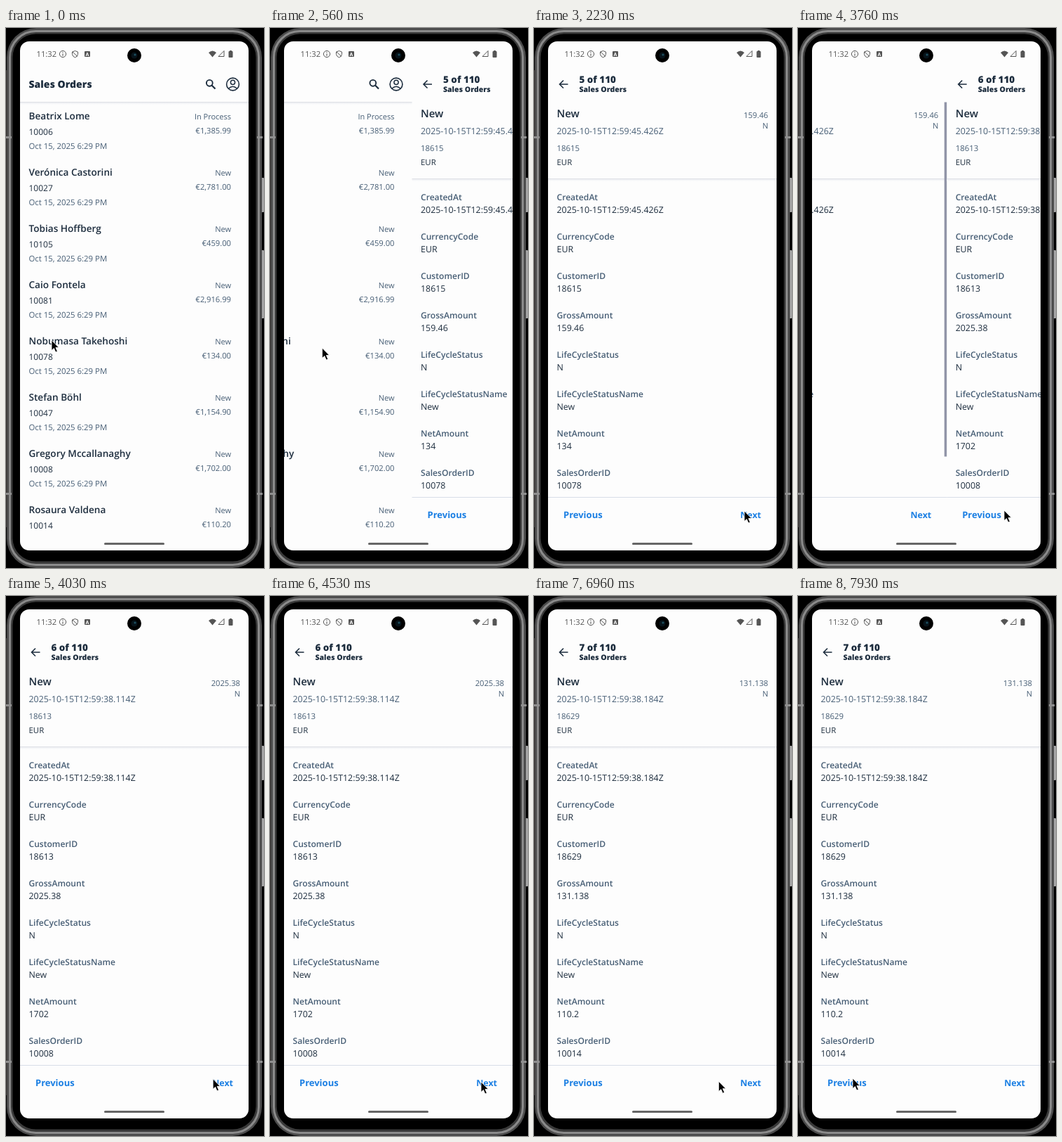
An HTML page that plays this animation: 368 by 768 pixels, repeating every 8 s.

```html
<!DOCTYPE html>
<html lang="en">
<head>
<meta charset="utf-8">
<title>Sales Orders</title>
<style>
html, body { margin: 0; width: 100%; height: 100%; overflow: hidden; background: #000; }
svg { display: block; width: 368px; height: 768px; font-family: "Open Sans", "Noto Sans", sans-serif; }
text { white-space: pre; text-rendering: geometricPrecision; }
</style>
</head>
<body>
<svg id="stage" viewBox="0 0 368 768"></svg>
<script>
const LOOP = 8000, WIDTH = 326, SLIDE = 350;
const INK = '#1d2d3e', SOFT = '#475e75', BLUE = '#1b7fe3';
const slides = [400, 3607, 6240];
const cursorPath = [
  [0, 65, 444], [480, 65, 444], [1130, 285, 702], [1750, 285, 702], [2150, 300, 687],
  [3300, 300, 687], [3660, 294, 686], [3900, 294, 686], [4400, 301, 691],
  [6700, 301, 691], [7700, 78, 686], [8000, 78, 686]
];
const orders = [
  ['Beatrix Lome', 10006, '1,385.99', 'In Process'],
  ['Verónica Castorini', 10027, '2,781.00'],
  ['Tobias Hoffberg', 10105, '459.00'],
  ['Caio Fontela', 10081, '2,916.99'],
  ['Nobumasa Takehoshi', 10078, '134.00'],
  ['Stefan Böhl', 10047, '1,154.90'],
  ['Gregory Mccallanaghy', 10008, '1,702.00'],
  ['Rosaura Valdena', 10014, '110.20']
];
const details = [
  ['2025-10-15T12:59:45.426Z', '18615', '159.46', '134', '10078'],
  ['2025-10-15T12:59:38.114Z', '18613', '2025.38', '1702', '10008'],
  ['2025-10-15T12:59:38.184Z', '18629', '131.138', '110.2', '10014']
];

const text = (x, y, size, str, fill = INK, weight = 400, anchor = 'start') =>
  `<text x="${x}" y="${y}" font-size="${size}" font-weight="${weight}" text-anchor="${anchor}" fill="${fill}">${str}</text>`;
const rect = (x, y, w, h, fill, r = 0, more = '') =>
  `<rect x="${x}" y="${y}" width="${w}" height="${h}" rx="${r}" fill="${fill}" ${more}/>`;
const path = (d, stroke, width, fill = 'none') =>
  `<path d="${d}" fill="${fill}" stroke="${stroke}" stroke-width="${width}"/>`;
const circle = (x, y, r, fill, stroke = 'none', width = 0) =>
  `<circle cx="${x}" cy="${y}" r="${r}" fill="${fill}" stroke="${stroke}" stroke-width="${width}"/>`;
const shadowLine = y => rect(20, y, WIDTH, 1, '#dfe1e6') + rect(20, y + 1, WIDTH, 3, 'url(#shade)');

function listPage() {
  const rows = orders.map(([name, id, price, status = 'New'], i) => {
    const y = 80 * i;
    return text(32.5, y + 129.5, 13.6, name, INK, 600) + text(32.5, y + 151.5, 12, id) +
      (i < 7 ? text(32.5, y + 171.5, 11.4, 'Oct 15, 2025 6:29 PM', SOFT) : '') +
      text(321, y + 129.5, 11, status, SOFT, 400, 'end') +
      text(321, y + 150, 11.2, '€' + price, SOFT, 400, 'end');
  }).join('');
  return text(32.5, 84.5, 14, 'Sales Orders', INK, 800) +
    circle(290.3, 78.3, 4.4, 'none', INK, 1.9) + path('M293.5 81.5 298.5 86.5', INK, 2.2) +
    circle(323.5, 80, 8.9, 'none', INK, 1.6) + circle(323.5, 77.3, 3.1, 'none', INK, 1.5) +
    path('M317.5 86Q323.5 80.5 329.5 86', INK, 1.5) + shadowLine(105) + rows;
}

function detailPage([date, customer, gross, net, id], i) {
  const fields = [['CreatedAt', date], ['CurrencyCode', 'EUR'], ['CustomerID', customer], ['GrossAmount', gross],
    ['LifeCycleStatus', 'N'], ['LifeCycleStatusName', 'New'], ['NetAmount', net], ['SalesOrderID', id]];
  return path('M48.5 80H37M42 74.5 36.5 80 42 85.5', INK, 1.6) +
    text(64.5, 78, 13.4, `${i + 5} of 110`, INK, 800) + text(64.5, 91, 10.5, 'Sales Orders', INK, 800) +
    text(32.5, 126.5, 15, 'New', INK, 600) + text(32.5, 151, 12.4, date, SOFT) +
    text(32.5, 174.5, 11.4, customer, SOFT) + text(32.5, 195, 11.4, 'EUR') +
    text(334, 127.5, 11.2, gross, SOFT, 400, 'end') + text(334, 143, 11, 'N', SOFT, 400, 'end') +
    shadowLine(214) +
    fields.map(([label, value], k) =>
      text(32.5, 245 + 56 * k, 12.1, label, SOFT, 600) + text(32.5, 262.5 + 56 * k, 12.4, value)).join('') +
    rect(20, 667, WIDTH, 1, '#d8dde8') +
    text(42, 697, 13, 'Previous', BLUE, 700) + text(324, 697, 12.4, 'Next', BLUE, 700, 'end') +
    rect(342.5, 105.5, 3.5, 504, '#9295a8', 0, `id="bar${i}"`);
}

const phone =
  rect(364, 213, 4, 49, '#a4a4a4', 1) + rect(364, 316, 4, 97, '#a4a4a4', 1) +
  rect(0, 60, 2, 650, '#35302e') +
  rect(1, 0, 364, 768, '#4c4c4c', 42) +
  rect(5.5, 4.5, 355, 759, '#3a3a3a', 37, 'stroke="#8a8a8a" stroke-width="3"') +
  [[0, 154], [0, 661], [358, 154], [358, 661]].map(([x, y]) => rect(x, y, 8, 3, '#8f8f8f')).join('') +
  rect(9.5, 8.5, 347, 750, '#000', 33) +
  rect(20, 19, WIDTH, 724, '#fdfdfd', 13);

const statusBar = text(43.5, 41.2, 11.2, '11:32', '#555') +
  circle(81, 37, 4.6, 'none', '#555', 1) + path('M81 36.5V39.8M81 34V35.2', '#555', 1.1) +
  path('M98.5 32.5 102.5 34V37.5Q102 40.5 98.5 42 95 40.5 94.5 37.5V34ZM95 34 102 40.5', '#555', 1) +
  rect(112, 33, 8, 8, '#555', 1) + text(116, 39.5, 7, 'A', '#fdfdfd', 700, 'middle') +
  path('M289 35Q294.5 30 300 35L294.5 41.5Z', 'none', 0, '#555') +
  path('M303 40.5H311V32.5Z', '#555', 1) + rect(317.5, 33, 6, 9, '#555', 1) + rect(319, 32, 3, 2, '#555') +
  circle(183, 39, 10, '#000') + circle(183, 39, 4.5, '#07131a') + circle(184, 38, 1.6, '#1d5060');

const stage = document.getElementById('stage');
stage.innerHTML = `<defs>
  <clipPath id="screen">${rect(20, 19, WIDTH, 724, '#000', 13)}</clipPath>
  <linearGradient id="shade" x2="0" y2="1"><stop stop-color="#eceef2"/><stop offset="1" stop-color="#fdfdfd"/></linearGradient>
  </defs>${phone}<g clip-path="url(#screen)"><g id="strip">` +
  [listPage(), ...details.map(detailPage)].map((page, i) => `<g transform="translate(${i * WIDTH})">${page}</g>`).join('') +
  `</g></g>${statusBar}${rect(140, 732, 86, 3, '#666', 1.5)}
  <path id="cursor" d="M0 0V14.5L3.4 11.5 5.8 17 8.3 15.9 5.9 10.5H10.3Z" fill="#000" stroke="#fff" stroke-width=".8"/>`;

const [strip, cursor, ...bars] = ['strip', 'cursor', 'bar0', 'bar1', 'bar2'].map(id => document.getElementById(id));
const ease = u => { u = Math.min(1, Math.max(0, u)); return u * u * (3 - 2 * u); };

function cursorAt(t) {
  const k = Math.max(1, cursorPath.findIndex(p => p[0] > t));
  const [t0, x0, y0] = cursorPath[k - 1], [t1, x1, y1] = cursorPath[k];
  const e = ease((t - t0) / (t1 - t0));
  return [x0 + (x1 - x0) * e, y0 + (y1 - y0) * e];
}

function draw(now) {
  const t = now % LOOP;
  const pages = slides.reduce((sum, start) => sum + ease((t - start) / SLIDE), 0);
  strip.setAttribute('transform', `translate(${-WIDTH * pages})`);
  // The scroll bar shows only on the page that is leaving.
  bars.forEach((bar, i) => bar.setAttribute('opacity', t > slides[i + 1] - 50 ? 1 : 0));
  cursor.setAttribute('transform', `translate(${cursorAt(t)})`);
  requestAnimationFrame(draw);
}
requestAnimationFrame(draw);
</script>
</body>
</html>
```
